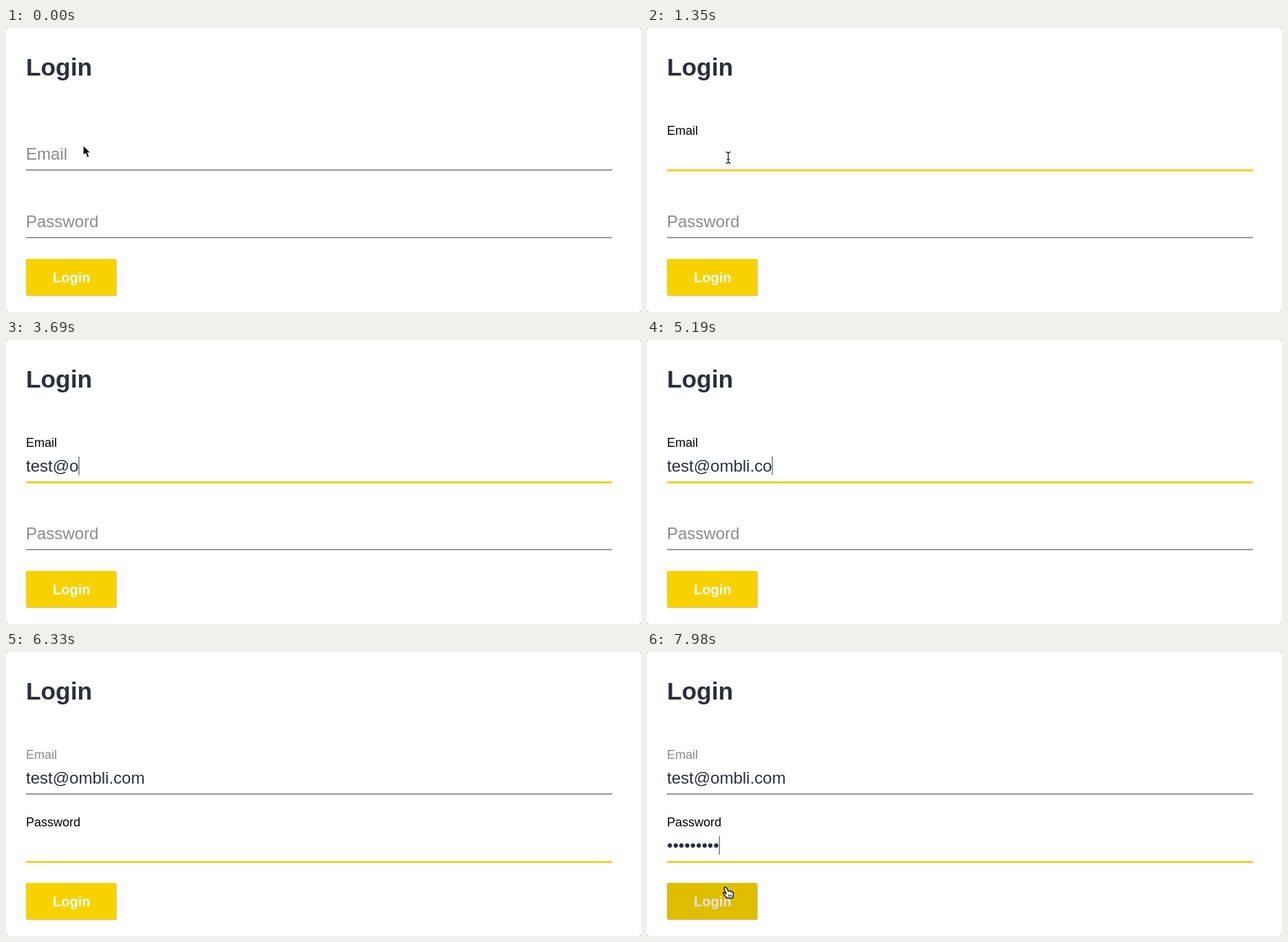
An HTML page that plays this animation: 922x412 px, repeating every 8 s.

```html
<!DOCTYPE html>
<html lang="en">
<head>
<meta charset="utf-8">
<title>Login form</title>
<style>
  html, body { margin: 0; width: 100%; height: 100%; overflow: hidden; background: #c4c4c4; }
  svg { display: block; width: 922px; height: 412px; font: 24px "Liberation Sans", Arial, sans-serif; }
  text { white-space: pre; }
  .value, .caret { fill: #2b303b; }
  .cursor { display: none; }
</style>
</head>
<body>
<svg viewBox="0 0 922 412">
  <rect width="922" height="412" rx="4" fill="#fff"/>
  <text x="29" y="69" font-size="35.3" font-weight="bold" fill="#2b303b">Login</text>
  <g id="fields"></g>
  <rect x="30" y="336" width="131" height="53" rx="2" fill="#cfcabb"/>
  <rect x="29" y="335" width="131" height="53" rx="2" fill="#f8d200"/>
  <text x="68" y="368.5" font-size="20" font-weight="bold" fill="#fff">Login</text>
  <rect id="shade" x="29" y="335" width="131" height="53" rx="2" opacity=".1"/>
  <g id="arrow" class="cursor">
    <path d="M0 0V15L3.5 12L6 18L9 16.8L6.5 11H11Z" stroke="#fff" stroke-width="1.2"/>
  </g>
  <g id="beam" class="cursor">
    <path d="M-3.5-8Q0-8 0-6Q0-8 3.5-8M0-6V6M-3.5 8Q0 8 0 6Q0 8 3.5 8M-2 2.5H2" fill="none" stroke="#222" stroke-width="1.3"/>
  </g>
  <g id="hand" class="cursor">
    <path d="M-2 0Q0-2 2 1L4 5Q6 3.500 7 5.500Q9 4.500 9.500 6.500Q11.500 6 11.500 9L10.500 15H2.500L-3 9Q-4 6-1.500 7L1 9L-2 2Z" fill="#fff" stroke="#111" stroke-width="1.4" stroke-linejoin="round"/>
    <path d="M4.500 10V13M6.500 10V13M8.500 10V13" stroke="#111"/>
  </g>
</svg>
<script>
const LOOP = 8000;
const $ = id => document.getElementById(id);
const clamp = v => Math.max(0, Math.min(1, v));
const mix = (a, b, p) => a + (b - a) * p;
const rgb = (a, b, p) => `rgb(${a.map((v, i) => Math.round(mix(v, b[i], p)))})`;
const YELLOW = [237, 211, 44], DARK = [33, 33, 33];

// cubic-bezier(.25, .8, .25, 1), solved by bisection
function ease(x) {
  x = clamp(x);
  const curve = (s, a, b) => 3 * (1 - s) ** 2 * s * a + 3 * (1 - s) * s * s * b + s ** 3;
  let lo = 0, hi = 1;
  for (let i = 0; i < 24; i++) {
    const mid = (lo + hi) / 2;
    if (curve(mid, .25, .25) < x) lo = mid; else hi = mid;
  }
  return curve(lo, .8, 1);
}

const fields = [
  { label: "Email", y: 0, text: "test@ombli.com", focus: 815, blur: 5800,
    keys: [1710, 1920, 2100, 2300, 2610, 3510, 3780, 3960, 4110, 4290, 4470, 5100, 5190, 5400] },
  { label: "Password", y: 98, text: "•".repeat(9), focus: 5810, blur: 9000, wake: 7930,
    keys: [6420, 6510, 6600, 6690, 6780, 6870, 6960, 7050, 7200] }
];

for (const f of fields) {
  const g = document.createElementNS("http://www.w3.org/2000/svg", "g");
  g.setAttribute("transform", `translate(0 ${f.y})`);
  g.innerHTML = `<rect x="29" y="205" width="851" height="2" fill="#999"/>
    <rect y="205" height="3"/><text class="label">${f.label}</text>
    <text class="value" x="29" y="191"></text>
    <rect class="caret" y="169" width="1" height="27"/>`;
  $("fields").append(g);
  f.bar = g.children[1];
  [f.labelEl, f.value, f.caret] = ["label", "value", "caret"].map(c => g.querySelector("." + c));
}

function drawField(f, t) {
  const age = t - f.focus, focused = age >= 0 && t < f.blur;

  const half = 425.5 * mix(.5, 1, ease(age / 300));
  f.bar.setAttribute("x", 454.5 - half);
  f.bar.setAttribute("width", 2 * half);
  f.bar.setAttribute("fill", rgb(DARK, YELLOW, ease(age / 300)));
  f.bar.setAttribute("opacity", focused ? ease(age / 100) : 0);

  const lift = ease(age / 400);
  const grey = 138 * (1 - lift + ease((t - f.blur) / 400));
  f.labelEl.setAttribute("transform", `translate(29 ${191 - 36 * lift}) scale(${1 - lift / 4})`);
  f.labelEl.setAttribute("fill", rgb([grey, grey, grey], [0, 0, 0], 0));

  const count = f.keys.filter(k => k <= t).length;
  f.value.textContent = f.text.slice(0, count);
  // the blink starts over at every key press
  const since = Math.max(...[f.focus, ...f.keys, f.wake || 0].filter(k => k <= t));
  f.caret.setAttribute("x", 29 + (count ? f.value.getComputedTextLength() : 0));
  f.caret.setAttribute("opacity", focused && (t - since) % 1000 < 500 ? 1 : 0);
}

const path = [[0, 112, 170], [30, 112, 170], [180, 124, 184], [330, 124, 184], [400, 130, 187],
  [480, 118, 188], [7400, 118, 188], [7600, 160, 260], [7800, 150, 330], [7920, 114, 342], [LOOP, 114, 342]];

function drawCursor(t) {
  const i = path.findIndex(p => p[0] > t);
  const [a, b] = [path[i - 1], path[i]];
  const p = (t - a[0]) / (b[0] - a[0]);
  const x = mix(a[1], b[1], p), y = mix(a[2], b[2], p);
  const onButton = x > 29 && x < 160 && y > 335 && y < 388;
  const onInput = fields.some(f => y > f.y + 172 && y < f.y + 197);
  const shape = t >= 1710 && t < 7400 ? "" : onButton ? "hand" : onInput ? "beam" : "arrow";
  for (const id of ["arrow", "beam", "hand"]) {
    $(id).style.display = id === shape ? "inline" : "none";
    $(id).setAttribute("transform", `translate(${x} ${y})`);
  }
  $("shade").style.display = shape === "hand" ? "inline" : "none";
}

function draw() {
  const t = performance.now() % LOOP;
  for (const f of fields) drawField(f, t);
  drawCursor(t);
  requestAnimationFrame(draw);
}
draw();
</script>
</body>
</html>
```
